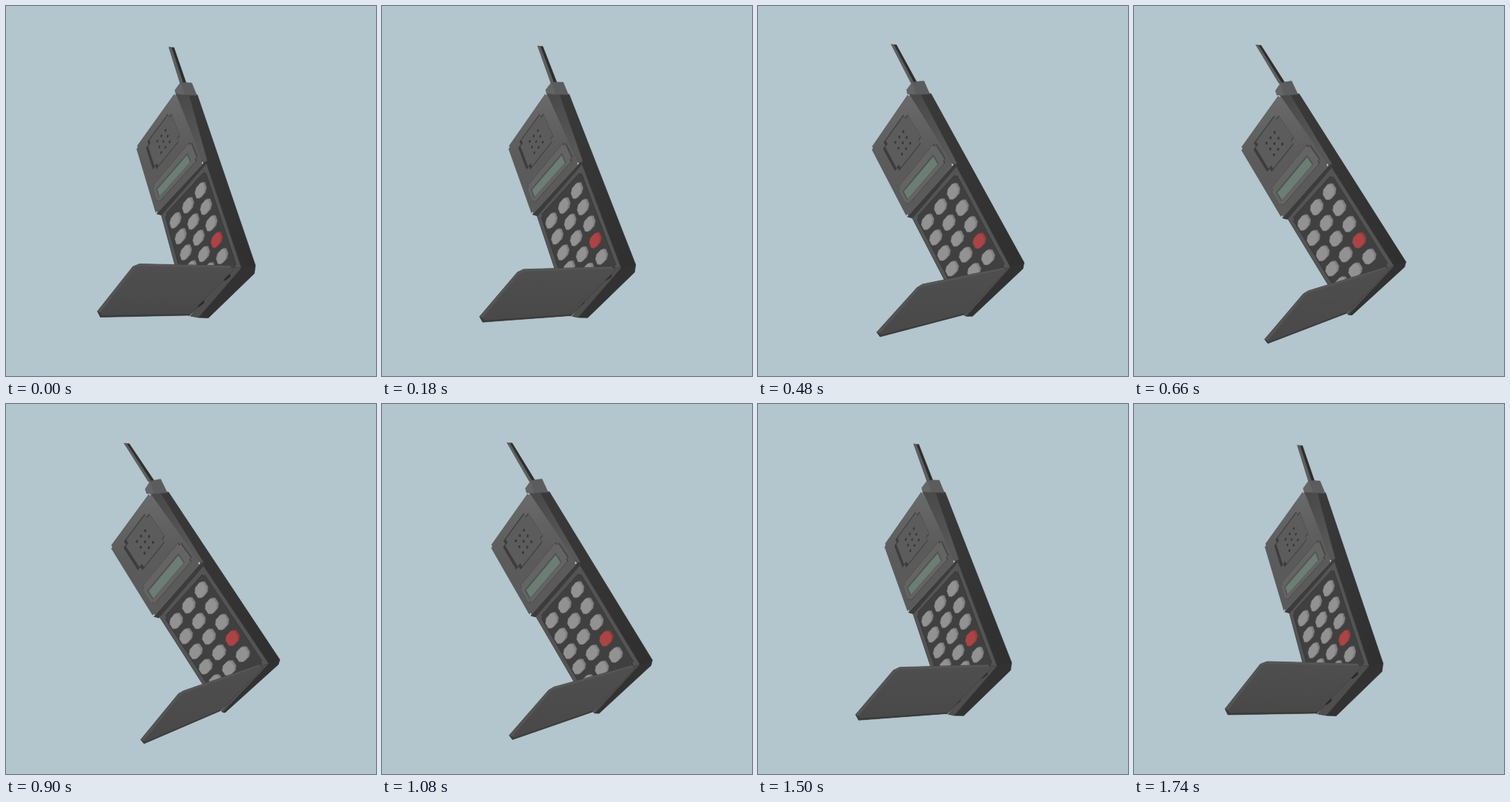
Animation of 500x500 px, one loop 1800 ms. Source, as an HTML page:

```html
<!DOCTYPE html>
<html>
<head>
<meta charset="utf-8">
<style>
  html, body { margin: 0; width: 100%; height: 100%; overflow: hidden; background: #b3c5cd; }
  svg { display: block; width: 100vw; height: 100vh; }
  polygon { stroke-linejoin: round; }
</style>
</head>
<body>
<svg id="stage" viewBox="0 0 500 500">
  <defs>
    <linearGradient id="front" x1="0.4" y1="0" x2="0.5" y2="1">
      <stop offset="0" stop-color="#6a6a6a"/><stop offset="0.5" stop-color="#5b5b5b"/><stop offset="1" stop-color="#5a5a5a"/>
    </linearGradient>
    <linearGradient id="side" x1="0" y1="0" x2="1" y2="1">
      <stop offset="0" stop-color="#3a3a3a"/><stop offset="1" stop-color="#2f2f2f"/>
    </linearGradient>
    <linearGradient id="band" x1="0" y1="0" x2="0.4" y2="1">
      <stop offset="0" stop-color="#484848"/><stop offset="1" stop-color="#585858"/>
    </linearGradient>
    <linearGradient id="flip" x1="0" y1="0" x2="0" y2="1">
      <stop offset="0" stop-color="#4f4f4f"/><stop offset="1" stop-color="#484848"/>
    </linearGradient>
  </defs>
</svg>
<script>
const LOOP = 1800, STEP = 60, LEAD = 60;
const SWING = Math.cos(2 * Math.PI * LEAD / LOOP);
const stage = document.getElementById('stage');
const shapes = [];

// A point is a function of the swing q: right pose (1), middle (0), left pose (-1).
const curve = (a, m, b, q) => m + q * (a - b) / 2 + q * q * ((a + b) / 2 - m);
const key = (ax, ay, mx, my, bx, by) => q => [curve(ax, mx, bx, q), curve(ay, my, by, q)];
const mix = (p, r, k) => q => {
  const [x, y] = p(q), [u, v] = r(q);
  return [x + (u - x) * k, y + (v - y) * k];
};
const shift = (p, dx, dy) => q => [p(q)[0] + dx, p(q)[1] + dy];

// Face coordinates: a runs from right to left, b from top to bottom.
const plane = (tr, tl, bl, br) => (a, b) => mix(mix(tr, br, b), mix(tl, bl, b), a);

function shape(fill, points, stroke = 'none', width = 0.7) {
  const node = document.createElementNS('http://www.w3.org/2000/svg', 'polygon');
  node.setAttribute('fill', fill);
  node.setAttribute('stroke', stroke);
  node.setAttribute('stroke-width', width);
  stage.append(node);
  shapes.push({ node, points });
}

function stepped(face, a0, a1, b0, b1, c, d) {
  return [
    [a0 + c, b0], [a1 - c, b0], [a1 - c, b0 + d], [a1, b0 + d],
    [a1, b1 - d], [a1 - c, b1 - d], [a1 - c, b1], [a0 + c, b1],
    [a0 + c, b1 - d], [a0, b1 - d], [a0, b0 + d], [a0 + c, b0 + d]
  ].map(([a, b]) => face(a, b));
}

function octagon(face, a, b, ra, rb) {
  return [[-1, -.5], [-.5, -1], [.5, -1], [1, -.5], [1, .5], [.5, 1], [-.5, 1], [-1, .5]]
    .map(([x, y]) => face(a + x * ra, b + y * rb));
}

// Body corners
const backTop = key(258.5, 120, 240, 118.5, 219.5, 119);
const backBottom = key(337, 350.5, 354.5, 347.5, 370, 345.5);
const frontBottom = key(318, 354, 335, 353.5, 355, 351);
const hingeLeft = key(249, 419, 272, 418.5, 291, 415);
const headTop = key(229, 117, 209, 117.5, 194.5, 120);
const headLeft = key(176, 191, 158.5, 191.5, 141, 193);
const headBottom = key(203, 281, 202, 284, 199.5, 287.5);
const headRight = key(267, 212, 265, 214, 263, 215);
const bandTop = key(247, 119, 225, 118, 208, 119);
const bandBottom = key(272, 209, 270, 212, 267, 214);

// Antenna
const tip = key(223, 56, 192.5, 52.5, 162.5, 53.5);
const root = key(239, 105, 217, 104, 196, 105);
shape('#5e5e5e', [shift(tip, -3, -.5), shift(tip, 1, 0), shift(root, 1, 0), shift(root, -3.5, 0)], '#484848', 0.6);
shape('#2d2d2d', [shift(tip, 1, 0), shift(tip, 4, 0), shift(root, 4.5, -1), shift(root, 1, 0)], '#2d2d2d', 0.4);

// Side and keypad
const padTop = key(271, 213, 269, 216, 267, 219);
const padLeft = key(209.5, 281, 208, 284, 207, 287);
const pad = plane(padTop, padLeft, shift(hingeLeft, -2, 0), frontBottom);
shape('url(#side)', [bandTop, backTop, backBottom, frontBottom, padTop, headRight], '#2f2f2f');
shape('#545454', [padTop, padLeft, shift(hingeLeft, -2, 0), frontBottom], '#3a3a3a');
shape('#404040', stepped(pad, 0.06, 0.94, 0.04, 0.96, 0.03, 0.02), '#313131');

const buttons = plane(
  key(263, 249, 264, 250, 264, 251), key(229, 289.5, 229, 291, 230, 293),
  key(257, 376, 269, 376, 283, 375.5), key(292, 338, 306.5, 339.5, 320, 338));
for (let row = 0; row < 5; row++) {
  for (let col = 0; col < 3; col++) {
    const red = row === 3 && col === 0;
    const outline = octagon(buttons, col / 2, row / 4, 0.165, 0.078);
    shape(red ? '#9c3c3c' : '#808080', outline.map(p => shift(p, 1.3, -0.6)), red ? '#863535' : '#707070', 0.5);
    shape(red ? '#ab4545' : '#929292', outline.map(p => shift(p, -1, 0.6)), red ? '#9c3c3c' : '#838383', 0.5);
  }
}

// Head
shape('url(#band)', [headTop, bandTop, bandBottom, headRight], '#444', 0.5);
shape('#3c3c3c', [headBottom, shift(headBottom, 7, 2), padTop, bandBottom, headRight]);
const head = plane(headTop, headLeft, headBottom, headRight);
shape('url(#front)', stepped(head, 0, 1, 0, 1, 0.03, 0.025), '#484848', 0.5);
shape('#3c3c3c', stepped(head, 0.2, 0.83, 0.1, 0.51, 0.06, 0.045));
shape('#5c5c5c', stepped(head, 0.2, 0.785, 0.112, 0.5, 0.06, 0.045), '#505050', 0.4);
for (let i = 0; i < 9; i++) {
  const a = 0.5 + (i % 3 - 1) * 0.1, b = 0.315 + (Math.floor(i / 3) - 1) * 0.083;
  shape('#383838', octagon(head, a, b, 0.018, 0.014));
}
const frame = stepped(head, 0.07, 0.93, 0.64, 0.9, 0.035, 0.03);
shape('#444', frame.map(p => shift(p, 1, -0.8)), '#404040', 0.5);
shape('#646464', frame, '#4a4a4a', 0.5);
shape('#505450', [head(.18, .72), head(.88, .72), head(.88, .85), head(.18, .85)]);
shape('#6c7e74', [head(.2, .74), head(.86, .74), head(.86, .845), head(.2, .845)], '#5f6d65', 0.4);

// Antenna base
const baseBack = key(236, 103, 215, 102.5, 195, 104);
const baseTop = key(251, 104, 231, 101.5, 209, 101.5);
const baseRight = key(258, 121, 238.5, 119, 218, 120);
const baseFront = key(242, 120, 220, 119.5, 200, 121.5);
const baseLeft = key(230, 119, 208, 118.5, 190, 121);
const baseEdge = key(228, 114, 207, 113, 188, 115);
shape('#656565', [baseEdge, baseBack, baseFront, baseLeft], '#5a5a5a', 0.4);
shape('#5b5c5d', [baseBack, baseTop, baseRight, baseFront], '#505050', 0.4);

// Hinge block
const lowRight = key(335.5, 361.5, 353, 356.5, 368, 352);
const lowLeft = key(273.5, 421.5, 286.5, 420, 296, 417);
const stripLeft = key(260, 421, 276, 420, 293, 416.5);
shape('#323232', [frontBottom, backBottom, lowRight, lowLeft, stripLeft], '#2c2c2c');
shape('#4e4e4e', [key(304, 353, 327, 355, 345, 354), frontBottom, stripLeft, hingeLeft], '#3c3c3c');
for (const slot of [key(298.5, 366.5, 316.5, 367.5, 322, 374), key(263, 402, 282, 401, 299, 396)]) {
  shape('#292929', [[-5, 3], [3, -4], [5, -3.5], [4, 0], [-3, 5]].map(([x, y]) => shift(slot, x, y)));
}

// Flip
const flipTip = key(123.5, 412.5, 151, 434.5, 182, 453.5);
const flipShoulder = key(171.5, 352, 205.5, 374.5, 233, 391.5);
const flipCorner = key(180.5, 348.5, 213, 370, 240, 387.5);
const flipHinge = key(304, 351, 327, 353.5, 343, 352);
const flipEnd = key(307, 357, 330, 358, 347, 357);
const flipBottom = key(247, 418, 271.5, 418, 290, 414.5);
const flipFoot = key(127.5, 420.5, 155.5, 441, 186.5, 459);
shape('url(#flip)', [flipTip, flipShoulder, flipCorner, flipHinge, flipEnd, flipBottom, flipFoot], '#3c3c3c', 0.6);
shape('#565656', [flipShoulder, flipCorner, flipHinge, shift(flipHinge, -1, 2.5), shift(flipCorner, 0, 3), shift(flipShoulder, 3, 2)]);
shape('#545454', [flipTip, flipShoulder, shift(flipShoulder, 3, 2), shift(flipTip, 4, 2)]);
shape('#3b3b3b', [flipTip, shift(flipTip, 4, 2), shift(flipFoot, 2, -2.5), shift(flipBottom, 1, -2), flipBottom, flipFoot]);

function draw(time) {
  const held = Math.floor(time / STEP) * STEP;
  const q = Math.cos(2 * Math.PI * (held + LEAD) / LOOP) / SWING;
  for (const { node, points } of shapes) {
    node.setAttribute('points', points.map(p => p(q).map(v => v.toFixed(2)).join()).join(' '));
  }
}

const start = performance.now();
function tick(now) {
  draw(Math.max(0, now - start) % LOOP);
  requestAnimationFrame(tick);
}
draw(0);
requestAnimationFrame(tick);
</script>
</body>
</html>
```
